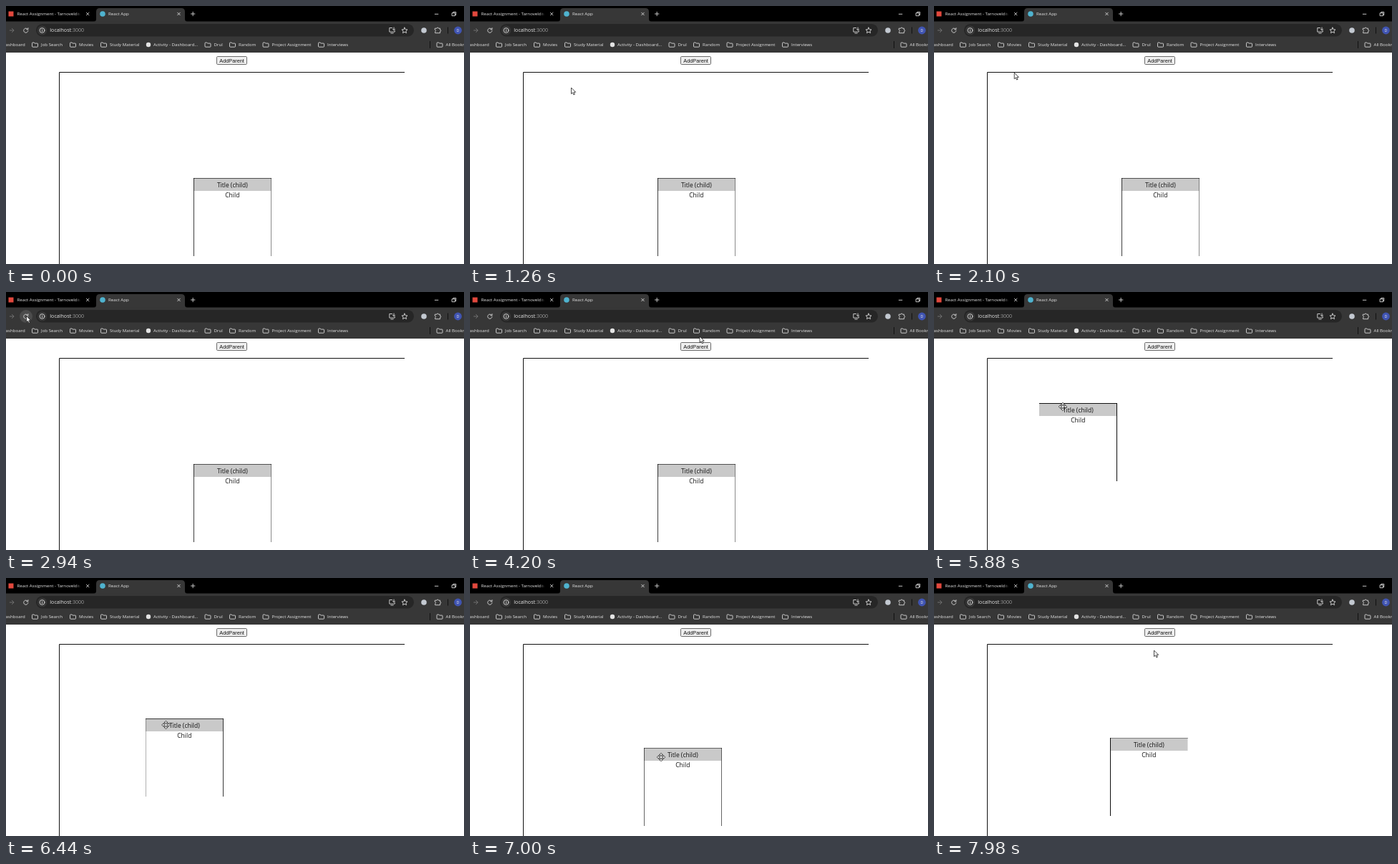
These frames come from a looping animation (640x360 px, 8 s). An HTML page:

```html
<!DOCTYPE html>
<html lang="en">
<head>
<meta charset="utf-8">
<title>React App</title>
<style>
  html, body { margin: 0; width: 100%; height: 100%; overflow: hidden; background: #fff; }
  svg { display: block; width: 100vw; height: 100vh; }
  text { font-family: "Open Sans", "Noto Sans", sans-serif; font-size: 6.15px; fill: #e6e6e6; white-space: pre; }
  .icon { fill: none; stroke: #d8d8d8; stroke-width: .9; stroke-linejoin: round; stroke-linecap: round; }
  .page { font-size: 8.5px; fill: #111; text-anchor: middle; }
</style>
</head>
<body>
<svg viewBox="0 0 640 360">
  <defs>
    <linearGradient id="fade">
      <stop stop-color="#000" stop-opacity="0"/><stop offset="1" stop-color="#000"/>
    </linearGradient>
    <clipPath id="tabClip"><rect width="104.5" height="22"/></clipPath>
    <path id="folder" d="M-4 -2.2q0-.8.8-.8h1.9l1 1.1h3.5q.8 0 .8.8v3.5q0 .8-.8.8h-6.4q-.8 0-.8-.8z"/>
    <path id="close" d="M-1.8-1.8 1.8 1.8M1.8-1.8-1.8 1.8"/>
  </defs>

  <rect width="640" height="360" fill="#fff"/>

  <!-- tab strip -->
  <rect width="640" height="22" fill="#000"/>
  <path d="M122 22q4 0 4-4V8q0-5 5-5h114q5 0 5 5v10q0 4 4 4z" fill="#373737"/>
  <rect x="3.5" y="7.5" width="7" height="7" fill="#e2483d"/>
  <text x="15.5" y="13.4" clip-path="url(#tabClip)">React Assignment - Tarnoveldis</text>
  <rect x="97" y="4" width="8" height="15" fill="url(#fade)"/>
  <circle cx="135" cy="11" r="3.8" fill="#4fb3cf"/>
  <text x="143" y="13.4">React App</text>
  <g class="icon">
    <use href="#close" x="114.2" y="11"/>
    <use href="#close" x="241.5" y="11"/>
    <path d="M258.5 11h5.4M261.2 8.3v5.4M599.3 11.3h4.6"/>
    <path d="M623.5 9.8h4v3.9h-4zM624.8 9.6V8.4h4v4.1h-1.1"/>
  </g>

  <!-- toolbar -->
  <rect y="21.5" width="640" height="43.5" fill="#373737"/>
  <circle id="hover" cx="28" cy="34" r="9" fill="#4c4c4c"/>
  <rect x="42" y="25" width="528" height="17.5" rx="8.7" fill="#262626"/>
  <circle cx="50.5" cy="34" r="6.6" fill="#373737"/>
  <g class="icon">
    <path d="M5.3 34h5.6M8.4 31.4 11 34l-2.6 2.6" stroke="#777"/>
    <path d="M30.4 32.4a3.1 3.1 0 1 0 .5 2.2M30.9 30.6v2.2h-2.2"/>
    <circle cx="50.5" cy="34" r="3.4"/><path d="M50.5 33.8v1.7M50.5 32.2v.1"/>
    <path d="M539.5 30.5h-3.7v5.6h7.4v-1.8M537.8 38h3.4M542 30v3.6M540.4 32.2l1.6 1.6 1.6-1.6"/>
    <path d="m557 30.1 1.2 2.6 2.8.3-2.1 1.9.6 2.8-2.5-1.5-2.5 1.5.6-2.8-2.1-1.9 2.8-.3z"/>
    <path d="M599.7 31.2h2.4a1.1 1.1 0 0 1 2.2 0h2.3v2.1a1.1 1.1 0 0 1 0 2.2v2.2h-6.9v-2a1.2 1.2 0 0 0 0-2.3z"/>
  </g>
  <circle cx="584" cy="34" r="3.8" fill="#c3c9d1"/>
  <path d="M617.5 29.5v9M592.5 49v10" stroke="#111"/>
  <circle cx="631.5" cy="34" r="5.4" fill="#4054b2"/>
  <text x="631.5" y="36" text-anchor="middle" style="font-size:5.4px">D</text>
  <text x="61.3" y="36.4" style="font-size:7.1px">localhost<tspan fill="#9a9a9a">:3000</tspan></text>

  <g id="bookmarks">
    <text x="26.7" y="56" text-anchor="end">Dashboard</text>
    <circle cx="199" cy="54" r="3.2" fill="#e3e3e3"/>
    <text x="206" y="56">Activity - Dashboard...</text>
  </g>

  <!-- page -->
  <rect x="294.5" y="70.5" width="42" height="11" rx="1.2" fill="#efefef" stroke="#6b6b6b"/>
  <text x="315.6" y="78.7" class="page" style="font:7.3px 'Liberation Sans',Arial,sans-serif">AddParent</text>
  <path d="M74.5 360V92.5H557" fill="none" stroke="#111"/>

  <g id="child">
    <rect x="-.5" y="-.5" width="108.5" height="18" fill="#c9c9c9"/>
    <path id="left" d="M0-.5v109" stroke="#000"/>
    <path id="right" d="M108-.5v109" stroke="#000"/>
    <path id="top" d="M-.5 0h109" stroke="#000"/>
    <text x="53.8" y="12.5" class="page">Title (child)</text>
    <text x="53.8" y="26.6" class="page">Child</text>
  </g>

  <g id="cursor" fill="#fff" stroke="#111" stroke-width=".75" stroke-linejoin="round">
    <path id="arrow" d="M0 0v8.6l2-1.8 1.4 3.1 1.5-.7-1.4-3h2.7z"/>
    <path id="move" d="M0-5.8 2.4-3.2H.9v2.3h2.3v-1.5L5.8 0 3.2 2.4V.9H.9v2.3h1.5L0 5.8-2.4 3.2h1.5V.9h-2.3v1.5L-5.8 0l2.6-2.4v1.5h2.3v-2.3h-1.5z"/>
  </g>
</svg>
<script>
const LOOP = 8000, STEP = 140;
const $ = id => document.getElementById(id);

const folders = [[40.5, "Job Search"], [93.5, "Movies"], [136.5, "Study Material"], [282, "Drul"],
  [316.5, "Random"], [363, "Project Assignment"], [440.5, "Interviews"], [606, "All Bookmarks"]];
$("bookmarks").insertAdjacentHTML("beforeend", folders.map(([x, name]) =>
  `<use href="#folder" class="icon" x="${x}" y="54"/><text x="${x + 8.5}" y="56">${name}</text>`).join(""));

// time, x, y
const cursorKeys = [[840, 200, 366], [1260, 141.5, 114], [1820, 141.5, 114], [2660, 28.5, 33.5],
  [3360, 28.5, 33.5], [4200, 321, 62], [4760, 294, 246], [5880, 180, 160],
  [7000, 267, 250], [7280, 274, 232], [7980, 307.5, 101]];
// time, x, y, opacity of left, right and top border
const childKeys = [[4760, 262.5, 240.5, .75, .45, .6], [5880, 147.5, 155.5, 0, .95, .9],
  [7000, 243.5, 237.5, .6, .6, .5], [7280, 246.5, 223.5, .95, 0, .35]];

function sample(keys, t) {
  const next = keys.findIndex(k => k[0] > t);
  if (next === 0) return keys[0].slice(1);
  if (next < 0) return keys[keys.length - 1].slice(1);
  const a = keys[next - 1], b = keys[next];
  const p = (t - a[0]) / (b[0] - a[0]), e = p * p * (3 - 2 * p);
  return a.slice(1).map((v, i) => v + (b[i + 1] - v) * e);
}

const place = (id, x, y) => $(id).setAttribute("transform", `translate(${x} ${y})`);
const show = (id, on) => $(id).setAttribute("visibility", on ? "visible" : "hidden");
const snap = v => Math.floor(v) + .5;

function draw(time) {
  const t = Math.floor(time % LOOP / STEP) * STEP;
  const [cx, cy] = sample(cursorKeys, t);
  const [x, y, ...edges] = sample(childKeys, t);
  place("child", snap(x), snap(y));
  ["left", "right", "top"].forEach((id, i) => $(id).setAttribute("opacity", edges[i]));

  const overTitle = cx > x && cx < x + 108 && cy > y && cy < y + 17.5;
  place("cursor", cx, cy);
  show("arrow", !overTitle);
  show("move", overTitle);
  show("hover", Math.hypot(cx - 28, cy - 34) < 9);
}

function tick(now) {
  draw(now);
  requestAnimationFrame(tick);
}
draw(0);
requestAnimationFrame(tick);
</script>
</body>
</html>
```
